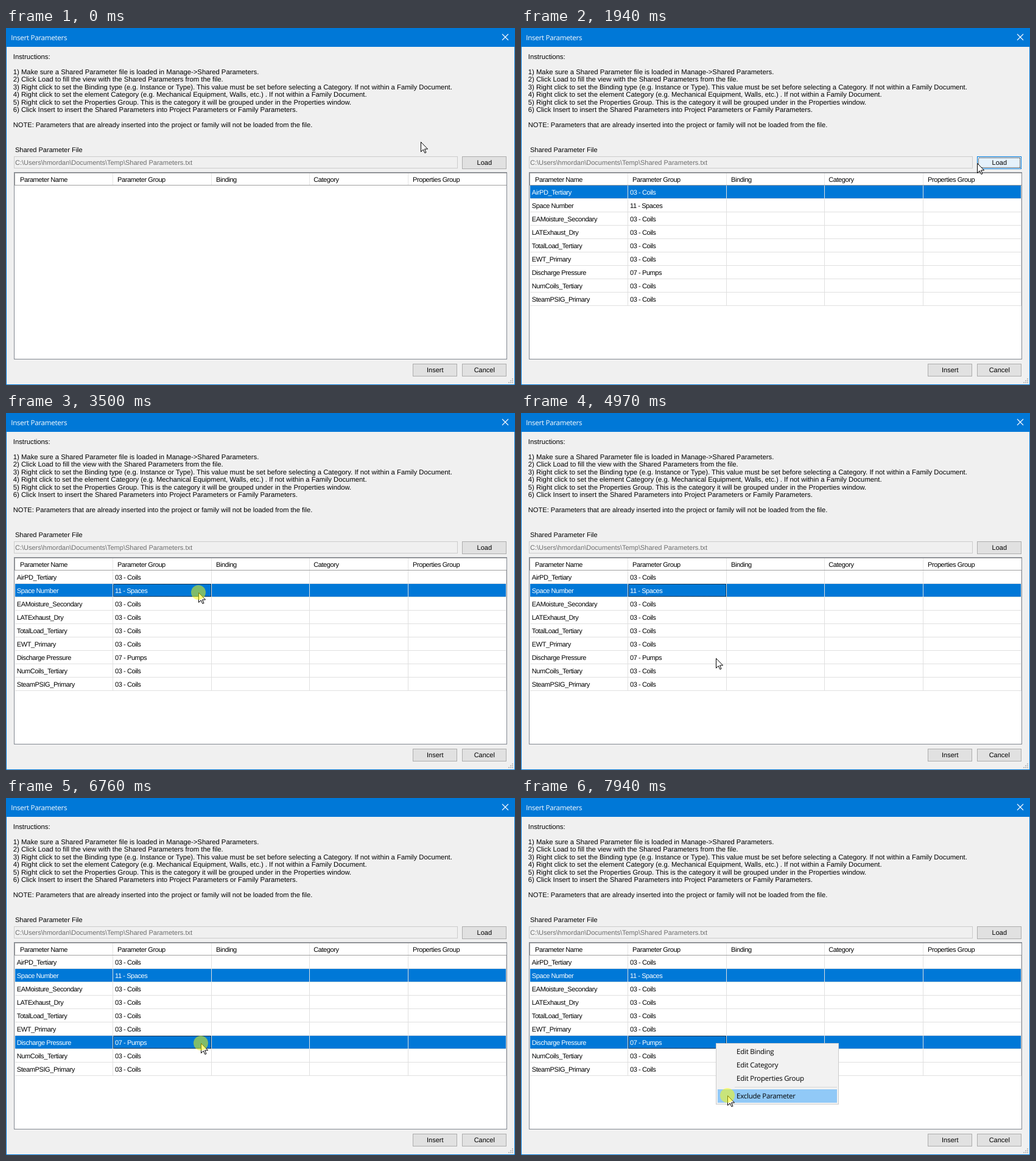
An HTML page for the animation above (8000 ms loop, 836x587 px).

```html
<!DOCTYPE html>
<html lang="en">
<head>
<meta charset="utf-8">
<title>Insert Parameters</title>
<style>
  html, body { margin: 0; height: 100%; overflow: hidden; background: #f0f0f0; }
  svg { display: block; width: 836px; height: 587px; }
  text { white-space: pre; text-rendering: geometricPrecision; }
  .label { font: 11px "Liberation Sans", Arial, sans-serif; }
  .help { font: 11.29px "Liberation Sans", Arial, sans-serif; }
  .note { font: 11.12px "Liberation Sans", Arial, sans-serif; }
  .cell { font: 11px "Liberation Sans", Arial, sans-serif; letter-spacing: -.41px; }
  .ui { font: 11.5px "Open Sans", "Noto Sans", sans-serif; letter-spacing: -.23px; }
  .mid { text-anchor: middle; }
</style>
</head>
<body>
<svg id="stage" viewBox="0 0 836 587"></svg>
<script>
const LOOP = 8000, BLUE = '#0078d7', LINE = '#e0e0e0';
const stage = document.getElementById('stage');

const help = [
  [51, 'Instructions:'],
  [76, '1) Make sure a Shared Parameter file is loaded in Manage->Shared Parameters.'],
  [88, '2) Click Load to fill the view with the Shared Parameters from the file.'],
  [101, '3) Right click to set the Binding type (e.g. Instance or Type). This value must be set before selecting a Category. If not within a Family Document.'],
  [113, '4) Right click to set the element Category (e.g. Mechanical Equipment, Walls, etc.) . If not within a Family Document.'],
  [126, '5) Right click to set the Properties Group. This is the category it will be grouped under in the Properties window.'],
  [138, '6) Click Insert to insert the Shared Parameters into Project Parameters or Family Parameters.']
];
const heads = [[23, 'Parameter Name'], [183, 'Parameter Group'], [345, 'Binding'],
  [505.2, 'Category'], [668, 'Properties Group']];
const edges = [14, 175, 337, 498, 660, 821];
const coils = '03 - Coils';
const rows = [['AirPD_Tertiary', coils], ['Space Number', '11 - Spaces'], ['EAMoisture_Secondary', coils],
  ['LATExhaust_Dry', coils], ['TotalLoad_Tertiary', coils], ['EWT_Primary', coils],
  ['Discharge Pressure', '07 - Pumps'], ['NumCoils_Tertiary', coils], ['SteamPSIG_Primary', coils]];
const menu = [[406, 'Edit Binding'], [428, 'Edit Category'], [450, 'Edit Properties Group'], [479, 'Exclude Parameter']];

// Pointer moves: first step, last step, step count, end x, end y, easing
const smooth = p => p * p * (3 - 2 * p);
const out = p => 1 - (1 - p) ** 2;
const moves = [
  [80, 610, 8, 780, 218, smooth],
  [1940, 1940, 1, 749, 222, smooth],
  [2030, 2720, 10, 487, 258, out],
  [2800, 3340, 8, 316, 295, smooth],
  [4430, 4970, 8, 320, 403, smooth],
  [7310, 7790, 7, 339, 489, smooth]
];
const clicks = [[1010, 1090], [3500, 3650], [5350, 5520], [6760, 6910], [7940, 8000]];

const rect = (x, y, w, h, fill) =>
  `<rect x="${x}" y="${y}" width="${w}" height="${h}" fill="${fill}" shape-rendering="crispEdges"/>`;
const box = (x, y, w, h, fill, line, b = 1) =>
  rect(x, y, w, h, line) + rect(x + b, y + b, w - 2 * b, h - 2 * b, fill);
const dots = (x, y, w, h) =>
  `<rect x="${x + .5}" y="${y + .5}" width="${w - 1}" height="${h - 1}" fill="none" stroke="#000" stroke-dasharray="1" shape-rendering="crispEdges"/>`;
const text = (x, y, s, cls, fill = '#000') =>
  `<text x="${x}" y="${y}" class="${cls}" fill="${fill}">${s.replace('>', '&gt;')}</text>`;
const button = (x, y, s, fill = '#e1e1e1', line = '#adadad', b = 1) =>
  box(x, y, 73, 21, fill, line, b) + text(x + 36.8, y + 14, s, 'label mid');

function pointer(t) {
  let x = 681, y = 187;
  for (const [t0, t1, n, x1, y1, ease] of moves) {
    if (t < t0) break;
    const step = n > 1 ? (t1 - t0) / (n - 1) : 1;
    const p = ease(Math.min(n, Math.floor((t - t0) / step + 1e-6) + 1) / n);
    x += (x1 - x) * p;
    y += (y1 - y) * p;
  }
  return [Math.round(x), Math.round(y)];
}

function frame() {
  let s = rect(0, 0, 836, 587, BLUE) + rect(1, 31, 834, 555, '#f0f0f0')
    + text(8.2, 20, 'Insert Parameters', 'ui', '#fff')
    + '<path d="M815 10l10 10m0-10l-10 10" stroke="#fff" stroke-width="1.1"/>';
  for (const [y, line] of help) s += text(11.8, y, line, 'help');
  s += text(11.8, 163, 'NOTE: Parameters that are already inserted into the project or family will not be loaded from the file.', 'note')
    + text(15, 204, 'Shared Parameter File', 'label')
    + box(13, 211, 729, 20, '#f0f0f0', '#ccc')
    + text(15, 225, 'C:\\Users\\hmordan\\Documents\\Temp\\Shared Parameters.txt', 'label', '#6d6d6d')
    + box(13, 237, 810, 308, '#fff', '#828790')
    + rect(14, 238, 808, 1, '#a0a0a0') + rect(14, 238, 1, 21, '#a0a0a0') + rect(14, 258, 808, 1, '#a0a0a0')
    + button(668, 552, 'Insert') + button(749, 552, 'Cancel');
  for (let i = 0; i < 3; i++)
    for (let j = 0; i + j < 3; j++) s += rect(831 - 3 * i, 582 - 3 * j, 2, 2, '#bfbfbf');
  return s;
}

function loadButton(t, x, y) {
  const hot = x >= 749 && x < 822 && y >= 211 && y < 232;
  const focus = t >= 1010 && t < 3500;
  const look = t >= 1010 && t < 1090 ? ['#cce4f7', '#005499']
    : hot ? ['#e5f1fb', BLUE] : focus ? ['#e1e1e1', BLUE, 2] : [];
  return button(749, 211, 'Load', ...look) + (focus ? dots(751, 213, 69, 17) : '');
}

function table(t, x, y) {
  let s = '';
  heads.forEach(([hx, name], i) => {
    const a = edges[i] + 1, b = edges[i + 1];
    if (y >= 239 && y < 259 && x >= a && x <= b) s += rect(a, 239, b - a + 1, 19, '#d9ebf9');
    else if (i < 4) s += rect(b, 239, 1, 19, '#e5e5e5');
    s += text(hx, 253, name, 'cell');
  });
  if (t < 1090) return s;
  const picked = t < 3500 ? [0] : t < 5350 ? [1] : [1, 6];
  rows.forEach(([name, group], i) => {
    const top = 259 + 22 * i, on = picked.includes(i), ink = on ? '#fff' : '#000';
    if (on) s += rect(15, top, 806, 21, BLUE);
    s += rect(15, top + 21, 807, 1, LINE);
    for (const e of edges.slice(1)) s += rect(e, top, 1, 22, LINE);
    s += text(17.8, top + 15, name, 'cell', ink) + text(179, top + 15, group, 'cell', ink);
    if (t >= 3500 && i === picked[picked.length - 1]) s += dots(176, top, 161, 21);
  });
  return s;
}

function popup(t, x, y) {
  if (t < 6910) return '';
  let s = box(320, 403, 202, 101, '#f2f2f2', '#ccc') + rect(351, 475, 168, 1, '#d7d7d7');
  for (const [top, name] of menu) {
    if (y >= top && y < top + 22) s += rect(323, top, 196, 22, '#91c9f7');
    s += text(354, top + 15, name, 'ui');
  }
  return s;
}

function arrow(t, x, y) {
  const down = clicks.some(([a, b]) => t >= a && t < b);
  return `<path transform="translate(${x} ${y})" d="M.5.5V16.5L4.2 12.9 6.9 18.5 9 17.6 6.5 12H11.6Z" fill="#fff" stroke="#000"/>`
    + (down ? `<circle cx="${x}" cy="${y}" r="12" fill="#ff0" opacity=".5"/>` : '');
}

const backdrop = frame();
let shown = '';
function draw(now) {
  const t = now % LOOP, [x, y] = pointer(t);
  const view = backdrop + [loadButton, table, popup, arrow].map(part => part(t, x, y)).join('');
  if (view !== shown) stage.innerHTML = shown = view;
  requestAnimationFrame(draw);
}
requestAnimationFrame(draw);
</script>
</body>
</html>
```
